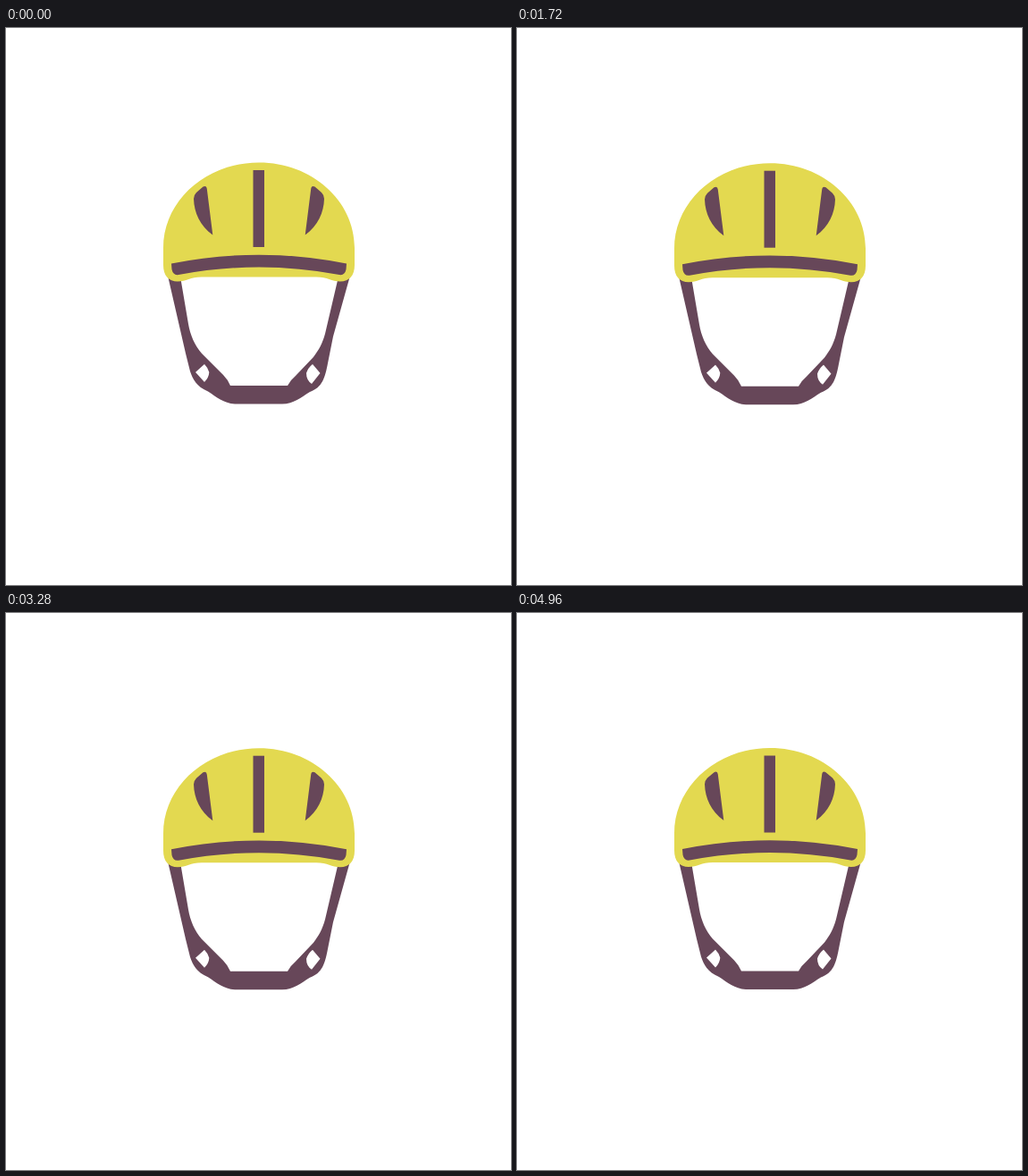
An HTML page for the animation above (5000 ms loop, 565x623 px).

```html
<!DOCTYPE html>
<html lang="en">
<head>
<meta charset="utf-8">
<title>Bobbing helmet</title>
<style>
  html, body { margin: 0; width: 100%; height: 100%; overflow: hidden; background: #fff; }
  svg { display: block; width: 565px; height: 623px; }
  .shell { fill: #e3d950; }
  .dark { fill: #674759; }
</style>
</head>
<body>
<svg viewBox="0 0 565 623">
  <defs>
    <path id="vent" d="M220.5 177.6Q224.3 175.8 224.8 180L231.3 231.5C217 221 210.5 207 210 191Q210 187 213 184Z"/>
  </defs>
  <g id="helmet">
    <path class="dark" fill-rule="evenodd" d="M181 277L195 278L204 331C206 343 211 355 219 364L243 388Q248 393 251 400H315
      Q318 394 324 389L344 368C350 360 354 353 357 342L372 278L385 277L366 345L360 375
      C357 391 354 402 340 407C330 413 322 420.5 309 420.5H258C244 420.5 236 413 226 406.5C213 401 209 393 206 384L201 364Z
      M212 385L222 376Q226 380 227.3 385Q227 391 222 396Z
      M336 386Q338 380 343 376L351.5 386L342 398Q336 394 336 386Z"/>
    <path class="shell" d="M283 150.5C342 150.5 390 193 390 246V265C390 277 384 283.5 374 283.5C364 283.5 360 278.5 347 278.5
      H219C206 278.5 202 283.5 192 283.5C182 283.5 176 277 176 265V246C176 193 224 150.5 283 150.5Z"/>
    <g class="dark">
      <rect x="276.5" y="159" width="12.5" height="86"/>
      <use href="#vent"/>
      <use href="#vent" transform="matrix(-1 0 0 1 566 0)"/>
      <path d="M185 263.5Q283 244 381 263.5L380.5 270Q379 277 373 276Q283 259 193 276Q187 277 185.5 270Z"/>
    </g>
  </g>
</svg>
<script>
  const LOOP = 5000, STEP = 40, BOBS = 3, DROP = 13.3, SOFT = 0.2;
  const helmet = document.getElementById('helmet');

  // Nearly linear bounce, slightly softened at both turns.
  function bob(t) {
    const phase = (t * BOBS / LOOP) % 1;
    const line = 1 - Math.abs(1 - 2 * phase);
    const wave = (1 - Math.cos(2 * Math.PI * phase)) / 2;
    return DROP * (line + (wave - line) * SOFT);
  }

  const start = performance.now();
  function draw() {
    const t = (performance.now() - start) % LOOP;
    const y = bob(Math.floor(t / STEP) * STEP);
    helmet.setAttribute('transform', `translate(0 ${y.toFixed(2)})`);
    requestAnimationFrame(draw);
  }
  draw();
</script>
</body>
</html>
```
